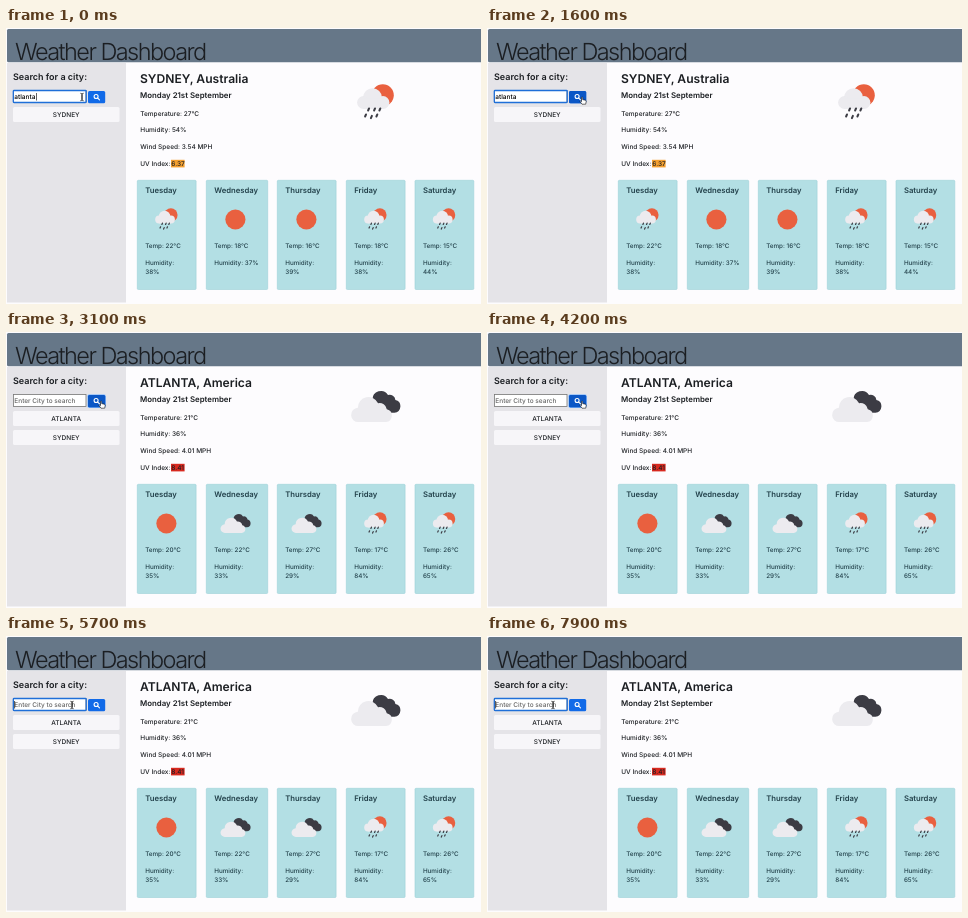
Animation, 475 px wide and 276 px high, one loop 8000 ms. Source, as an HTML page:

```html
<!DOCTYPE html>
<html lang="en">
<head>
<meta charset="utf-8">
<title>Weather Dashboard</title>
<style>
html, body { margin: 0; width: 100%; height: 100%; overflow: hidden; background: #fdfcfe; }
svg { display: block; width: 475px; height: 276px; }
text { font: 450 6.5px Inter, "Liberation Sans", sans-serif; fill: #1b1e22; text-rendering: geometricPrecision; white-space: pre; }
.title { font: 300 23.5px Inter, Roboto, sans-serif; font-optical-sizing: none; letter-spacing: -1.55px; }
.h4 { font-size: 9px; font-weight: 600; }
.city { font-size: 12.1px; font-weight: 600; }
.h5 { font-size: 7.85px; font-weight: 600; }
.day { font-size: 7.7px; font-weight: 600; }
.card text { fill: #22404a; }
.card .small { font-size: 6.3px; }
.mid { text-anchor: middle; }
.typed { font-size: 6.5px; fill: #000; }
.hint { fill: #666; font-size: 6.5px; }

/* one shared 8 s timeline, hard switches */
.before, .waiting, .after, .loaded, .ring, .focus, .hover, .ibeam, .hand, .caret1, .caret2 {
  animation: 8s step-end infinite;
}
.before { animation-name: before; }
.waiting { animation-name: waiting; }
.after { animation-name: after; }
.loaded { animation-name: loaded; }
.ring { animation-name: ring; }
.focus { animation-name: focus; }
.hover, .hand { animation-name: hover; }
.ibeam { animation-name: ibeam; }
.caret1 { animation-name: caret1; }
.caret2 { animation-name: caret2; }
.pointer { animation: move 8s ease-in-out infinite; }

@keyframes before { 0% { opacity: 1 } 23.75%, 100% { opacity: 0 } }
@keyframes waiting { 0% { opacity: 0 } 23.75% { opacity: 1 } 37.5%, 100% { opacity: 0 } }
@keyframes after { 0% { opacity: 0 } 23.75%, 100% { opacity: 1 } }
@keyframes loaded { 0% { opacity: 0 } 37.5%, 100% { opacity: 1 } }
@keyframes ring { 0% { opacity: 0 } 23.75% { opacity: 1 } 68.75%, 100% { opacity: 0 } }
@keyframes focus { 0% { opacity: 1 } 23.75% { opacity: 0 } 68.75%, 100% { opacity: 1 } }
@keyframes hover { 0% { opacity: 0 } 10% { opacity: 1 } 61.25%, 100% { opacity: 0 } }
@keyframes ibeam { 0% { opacity: 1 } 10% { opacity: 0 } 61.25%, 100% { opacity: 1 } }
@keyframes caret1 { 0%, 12.5% { opacity: 1 } 6.25%, 18.75%, 100% { opacity: 0 } }
@keyframes caret2 { 0%, 75%, 87.5% { opacity: 0 } 68.75%, 81.25%, 93.75%, 100% { opacity: 1 } }
@keyframes move {
  0%, 6.25% { transform: translate(76px, 69px); animation-timing-function: ease-in }
  10% { transform: translate(82px, 70px); animation-timing-function: ease-out }
  15%, 57.5% { transform: translate(96px, 72px); animation-timing-function: ease-in }
  61.25% { transform: translate(82px, 71px); animation-timing-function: ease-out }
  66.25%, 100% { transform: translate(66px, 69px) }
}
</style>
</head>
<body>
<svg viewBox="0 0 475 276">
  <defs>
    <g id="sun"><circle r="16.5" fill="#e9603f"/></g>
    <g id="rain">
      <circle cx="7.3" cy="-7.3" r="11" fill="#e9603f"/>
      <g fill="#ecebef">
        <circle cx="-3" cy="-4.8" r="9.5"/>
        <circle cx="-12" cy="0" r="6.4"/>
        <circle cx="7.5" cy="0" r="6.4"/>
        <rect x="-12" y="-4" width="19.5" height="10.4"/>
      </g>
      <path stroke="#3c3c44" stroke-width="2" stroke-linecap="round" d="M-6.5 6l-.9 2M-.5 6l-.9 2M4.8 6l-.9 2M-9.5 12l-.9 2M-3.6 13.3l-1 2.4M1.8 12l-.9 2"/>
    </g>
    <g id="clouds">
      <path fill="#3c3c44" d="M0 6a6 6 0 0 1-3-13a8.4 8.4 0 0 1 15.5-4.6a5.8 5.8 0 0 1 7.4 5.1a6.5 6.5 0 0 1-1 12.8z"/>
      <path fill="#ecebef" d="M-17 15.5a7 7 0 0 1-.6-14.2a10.6 10.6 0 0 1 20.2-4.6a7.4 7.4 0 0 1 8.7 6a6.5 6.5 0 0 1-.8 12.8z"/>
    </g>
  </defs>

  <rect x="1" y="1" width="482" height="33.3" rx="1.5" fill="#667788"/>
  <text class="title" x="9" y="32">Weather Dashboard</text>

  <rect x="1" y="35" width="119" height="68" fill="#e5e4e8"/>
  <text class="h4" x="7" y="52">Search for a city:</text>

  <rect x="7.5" y="62.5" width="72.5" height="12" fill="#fff" stroke="#777" stroke-width=".8"/>
  <rect class="focus" x="7.3" y="62.5" width="72.9" height="12" rx=".8" fill="none" stroke="#1f6fd8" stroke-width="1.3"/>
  <text class="before typed" x="8.3" y="71">atlanta</text>
  <text class="after hint" x="8.3" y="71">Enter City to search</text>
  <path class="caret1" d="M30.4 65v7.5" stroke="#222" stroke-width=".8"/>
  <path class="caret2" d="M8.6 65v7.5" stroke="#222" stroke-width=".8"/>

  <rect class="ring" x="81.3" y="62.2" width="18.6" height="13.8" rx="2" fill="#93c0fa"/>
  <rect x="82" y="63" width="17.2" height="12.2" rx="1.5" fill="#116ae8"/>
  <rect class="hover" x="82" y="63" width="17.2" height="12.2" rx="1.5" fill="#0b57c6"/>
  <g fill="none" stroke="#fff" stroke-width="1.1" stroke-linecap="round">
    <circle cx="90.1" cy="68.5" r="2"/><path d="M91.7 70.1l1.8 1.8"/>
  </g>

  <g id="history"></g>
  <g id="views"></g>

  <g class="pointer">
    <path class="ibeam" fill="none" stroke="#222" stroke-width=".8" d="M-1.6-3.7q1.6 0 1.6 1v5.4q0 1-1.6 1M1.6-3.7q-1.6 0-1.6 1v5.4q0 1 1.6 1"/>
    <path class="hand" fill="#fff" stroke="#111" stroke-width=".6" stroke-linejoin="round" d="M-1.5-2.6q.7-.8 1.2 0v2.2l2.6.6q1 .3.9 1.3l-.5 2.7h-3.7l-2-2.6q.2-1 1.5 0z"/>
  </g>
</svg>
<script>
const text = (x, y, s, cls = "") => `<text class="${cls}" x="${x}" y="${y}">${s}</text>`;
const icon = (id, x, y, k = 1) => `<use href="#${id}" transform="translate(${x} ${y}) scale(${k})"/>`;
const entry = (y, name) =>
  `<rect x="7" y="${y}" width="106.5" height="15" rx="1.5" fill="#f7f6f9"/>` + text(60.2, y + 10, name, "mid");

const days = ["Tuesday", "Wednesday", "Thursday", "Friday", "Saturday"];
const lefts = [131, 200, 271, 340, 408.7];

function card(i, [sky, temp, hum], oneLine) {
  const x = lefts[i], wide = i === 1 ? 62 : 59.4, tx = x + 8.2;
  const line = (y, s) => text(tx, y, s, "small");
  return `<g class="card">
    <rect x="${x + .3}" y="152.3" width="${wide - .6}" height="109.2" rx="1" fill="#b3dfe4" stroke="#9dd1d7" stroke-width=".6"/>
    ${text(tx, 165.3, days[i], "day")}
    ${icon(sky, x + 29.4, 191.5, .61)}
    ${line(220.2, `Temp: ${temp}°C`)}
    ${oneLine ? line(236.5, `Humidity: ${hum}%`) : line(236.5, "Humidity:") + line(246.4, hum + "%")}
  </g>`;
}

function view(cls, v) {
  return `<g class="${cls}">
    <rect x="1" y="102" width="119" height="172.5" fill="#e5e4e8"/>
    ${v.history.map((name, i) => entry(79 + 19 * i, name)).join("")}
    ${text(134, 55.3, v.city, "city")}
    ${text(134, 69.8, "Monday 21st September", "h5")}
    ${icon(v.sky, 369.5, 74.5)}
    ${text(134.3, 88, `Temperature: ${v.temp}°C`)}
    ${text(134.3, 104.3, `Humidity: ${v.hum}%`)}
    ${text(134.3, 121, `Wind Speed: ${v.wind} MPH`)}
    ${text(134.3, 137.6, "UV Index:")}
    <rect x="165" y="131.8" width="13.6" height="7.6" fill="${v.uvColor}"/>
    ${text(165.3, 137.6, v.uv)}
    ${v.week.map((d, i) => card(i, d, i === v.oneLine)).join("")}
  </g>`;
}

const sydney = {
  history: ["SYDNEY"], city: "SYDNEY, Australia", sky: "rain",
  temp: 27, hum: 54, wind: "3.54", uv: "6.37", uvColor: "#f5a030", oneLine: 1,
  week: [["rain", 22, 38], ["sun", 18, 37], ["sun", 16, 39], ["rain", 18, 38], ["rain", 15, 44]]
};
const atlanta = {
  history: ["ATLANTA", "SYDNEY"], city: "ATLANTA, America", sky: "clouds",
  temp: 21, hum: 36, wind: "4.01", uv: "8.41", uvColor: "#d8291f", oneLine: -1,
  week: [["sun", 20, 35], ["clouds", 22, 33], ["clouds", 27, 29], ["rain", 17, 84], ["rain", 26, 65]]
};

document.getElementById("history").innerHTML = `<g class="waiting">${entry(79, "SYDNEY")}</g>`;
document.getElementById("views").innerHTML = view("before", sydney) + view("loaded", atlanta);
</script>
</body>
</html>
```
